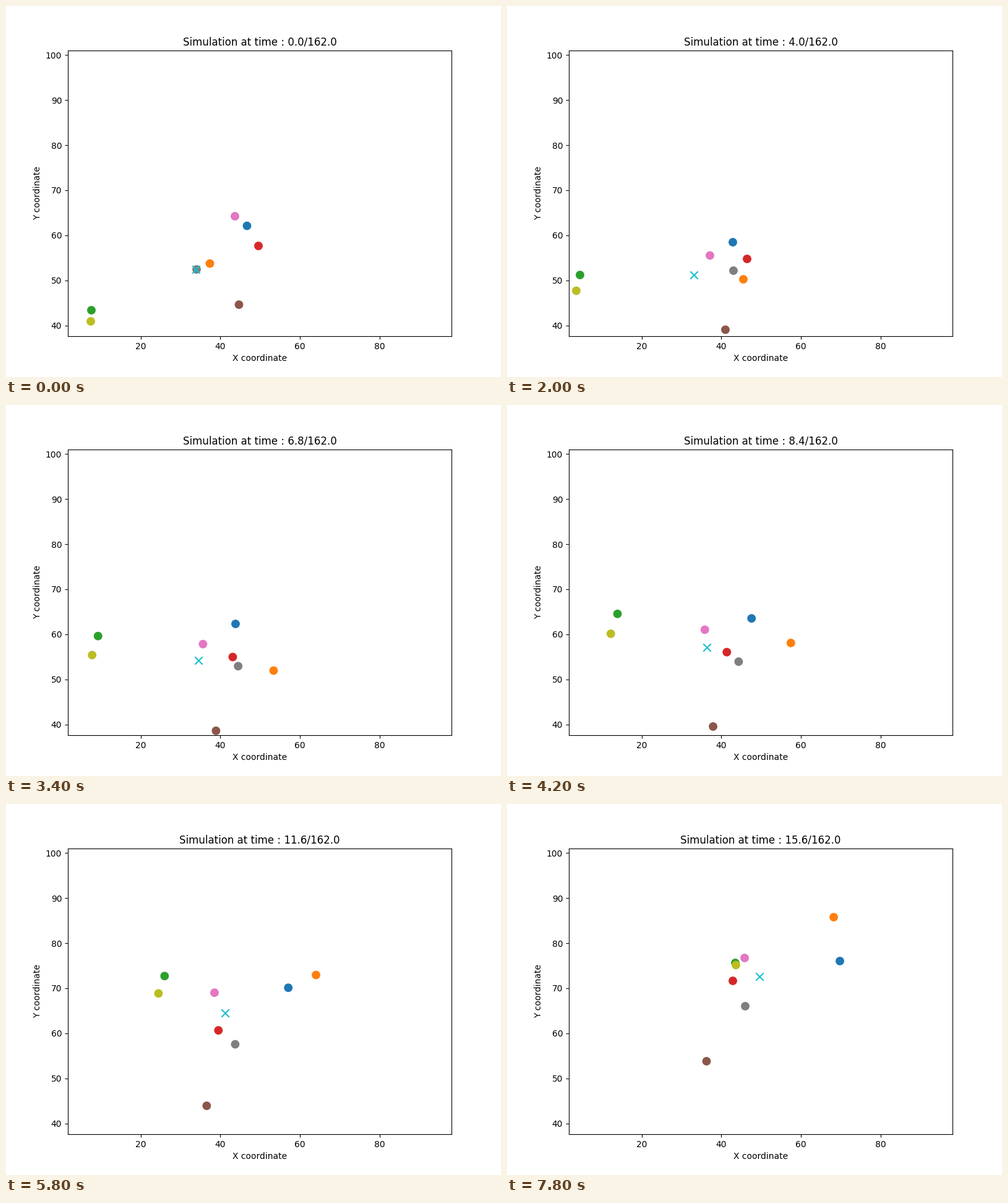
These frames come from a looping animation (800 by 600 pixels, 8 s). A matplotlib script:

```python
import numpy as np
import matplotlib.pyplot as plt
from matplotlib.animation import FuncAnimation

FRAMES, STEP = 40, 200
DT, END = 0.4, 162.0
XLIM, YLIM = (1.72, 98.09), (37.62, 100.99)
BOX = (100, 720, 534, 72)  # axes edges on the stage: left, right, bottom, top

# Key times in seconds: four make a plain cubic, seven a path with sharper turns
SMOOTH = (0, 2, 5, 7.8)
SHARP = (0, 1, 2, 3.4, 5, 6.6, 7.8)

# Stage positions (x values, y values) of each agent at its key times
PATHS = {
    "tab:blue": ([389.5, 373, 365, 371, 427, 485, 538],
                 [355.5, 395, 382, 354, 329.5, 263, 254]),
    "tab:orange": ([329.5, 346, 382, 432.5, 482, 515.5, 528],
                   [416.5, 434.5, 442, 429.5, 327, 235, 183]),
    "tab:green": ([138, 118, 215, 369], [492, 435, 305, 257]),
    "tab:red": ([408, 388, 347, 365], [388, 409, 386, 286]),
    "tab:brown": ([376.5, 353, 328, 322.5], [483, 523.5, 507, 416]),
    "tab:pink": ([370, 328, 326, 384], [340, 403.5, 335, 249]),
    "tab:gray": ([308, 366, 372, 385], [426, 428, 404, 327]),
    "tab:olive": ([137, 112, 204, 370], [510, 460.5, 336.5, 260.5]),
}


def basis(t, keys):
    """Terms of a cubic spline with not-a-knot ends."""
    t = np.atleast_1d(t).astype(float)
    cols = [t ** p for p in range(4)]
    cols += [np.maximum(t - k, 0) ** 3 for k in keys[2:-2]]
    return np.stack(cols, axis=1)


def to_data(px, py):
    left, right, bottom, top = BOX
    x = XLIM[0] + (px - left) / (right - left) * (XLIM[1] - XLIM[0])
    y = YLIM[0] + (bottom - py) / (bottom - top) * (YLIM[1] - YLIM[0])
    return x, y


def track(xs, ys):
    """Positions of one agent in every frame."""
    keys = SMOOTH if len(xs) == len(SMOOTH) else SHARP
    times = np.arange(FRAMES) * STEP / 1000
    coefs = np.linalg.solve(basis(keys, keys), np.transpose([xs, ys]))
    return np.stack(to_data(*(basis(times, keys) @ coefs).T), axis=1)


tracks = np.stack([track(*path) for path in PATHS.values()], axis=1)
centers = tracks.mean(axis=1)

fig, ax = plt.subplots(figsize=(8, 6), dpi=100)
ax.set(xlim=XLIM, ylim=YLIM, xlabel="X coordinate", ylabel="Y coordinate")
agents = ax.scatter(*tracks[0].T, s=80, c=list(PATHS))
center = ax.scatter(*centers[0], s=80, c="tab:cyan", marker="x")
title = ax.set_title("")


def draw(i):
    agents.set_offsets(tracks[i])
    center.set_offsets(centers[i])
    title.set_text(f"Simulation at time : {i * DT:.1f}/{END}")
    return agents, center, title


anim = FuncAnimation(fig, draw, frames=FRAMES, interval=STEP,
                     init_func=lambda: draw(0), repeat=True, repeat_delay=0)
plt.show()
```
